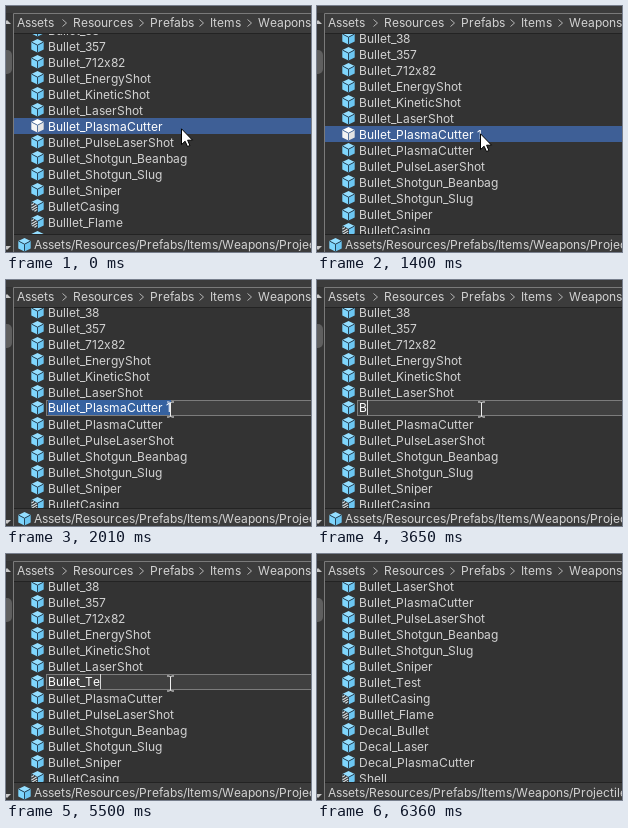
These frames come from a looping animation (305x246 px, 6.82 s). An HTML page:

```html
<!DOCTYPE html>
<html lang="en">
<head>
<meta charset="utf-8">
<title>Renaming a prefab</title>
<style>
  html, body { margin: 0; width: 100%; height: 100%; overflow: hidden; background: #333; }
  svg { display: block; }
  text {
    font: 12px Inter, "Liberation Sans", sans-serif;
    font-kerning: none;
    font-feature-settings: "calt" 0;
    fill: #d2d2d2;
    white-space: pre;
  }
  .on text { fill: #fff; }
  .cube { --top: #94deff; --left: #7fd6fd; --right: #6cc6f2; --edge: #27455a; }
  .on .cube { --top: #fff; --left: #f4f4f4; --right: #e4e4e4; --edge: #56749f; }
</style>
</head>
<body>
<svg id="stage" width="305" height="246" xmlns="http://www.w3.org/2000/svg">
  <defs>
    <g id="cube">
      <path d="M6.5 1 12.7 4 6.5 7.2.3 4Z" fill="var(--top)"/>
      <path d="M.3 4 6.5 7.2V14.6L.3 11.5Z" fill="var(--left)"/>
      <path d="M12.7 4 6.5 7.2V14.6L12.7 11.5Z" fill="var(--right)"/>
      <path d="M.8 4.2 6.5 7.2 12.2 4.2M6.5 7.2V14.4" fill="none" stroke="var(--edge)"/>
    </g>
    <g id="variant">
      <use href="#cube"/>
      <path d="M.3 4 6.5 7.2V14.6L.3 11.5Z" fill="#333"/>
      <path d="M.5 7 3 5.4M.5 10 5.6 6.8M1.2 12 6.2 9M3.4 13.2 6.2 11.6" stroke="#d5dde1" stroke-width="1.2"/>
    </g>
  </defs>

  <rect width="305" height="246" fill="#333"/>
  <svg id="list" x="8" y="28" width="297" height="200" viewBox="8 28 297 200"></svg>

  <!-- toolbar, path bar and footer -->
  <rect width="305" height="7" fill="#3c3c3c"/>
  <g id="bars">
    <rect x="8" y="8" width="297" height="19" fill="#3c3c3c"/>
    <rect x="8" y="27" width="297" height="1" fill="#232323"/>
    <rect x="8" y="228" width="297" height="18" fill="#3c3c3c"/>
    <rect x="8" y="228" width="297" height="1" fill="#232323"/>
    <use id="footIcon" class="cube" href="#cube" x="12" y="231"/>
  </g>

  <!-- tree scrollbar and panel outline -->
  <rect y="8" width="7" height="238" fill="#353535"/>
  <rect x="-8" y="44" width="14" height="24" rx="5" fill="#5f5f5f"/>
  <path d="M-3 18 1 14 5 18ZM-3 240H5L1 244Z" fill="#c8c8c8"/>
  <path d="M7.5 246V7.5H305" fill="none" stroke="#7a7a7a"/>

  <path id="arrow" d="M.5.8V16.6L4.1 13.2 6.5 18.5 8.9 17.5 6.6 12.2H11.5Z" fill="#fff" stroke="#000"/>
  <circle id="click" cx="162" cy="128" r="12" fill="#ff0" fill-opacity=".47"/>
  <path id="beam" d="M-3.5-7.5H-1L0-6.5 1-7.5H3.5M0-6.5V6.5M-3.5 7.5H-1L0 6.5 1 7.5H3.5" fill="none" stroke="#f0f0f0"/>
</svg>

<script>
const LOOP = 6820;
const EDIT = 2010, TYPE = 3650, DONE = 6360;
const NAME = "Bullet_Test";
const COPY = "Bullet_PlasmaCutter 1";
const $ = id => document.getElementById(id);
const list = $("list");

function add(parent, tag, attrs = {}) {
  const el = document.createElementNS("http://www.w3.org/2000/svg", tag);
  for (const k in attrs) el.setAttribute(k, attrs[k]);
  parent.append(el);
  return el;
}

// The editor's text sits on whole pixels: each letter's advance is rounded
const pen = document.createElement("canvas").getContext("2d");
pen.font = '12px Inter, "Liberation Sans", sans-serif';
const advance = c => Math.round(pen.measureText(c).width);
const width = s => [...s].reduce((sum, c) => sum + advance(c), 0);

function write(el, x, s) {
  el.setAttribute("x", [...s].map((c, i) => x + width(s.slice(0, i))).join(" "));
  el.textContent = s;
  return el;
}

const label = (parent, x, y, s) => write(add(parent, "text", { y }), x, s);
const place = (el, x, y) => el.setAttribute("transform", `translate(${x} ${y})`);
const show = (el, on) => el.setAttribute("display", on ? "inline" : "none");

// Last table entry whose time has come
const at = (table, t) => table.filter(s => s[0] <= t).pop();

// Path bar and footer
const bars = $("bars");
[["Assets", 11], ["Resources", 67], ["Prefabs", 144], ["Items", 204], ["Weapons", 252]]
  .forEach(([word, x], i) => {
    label(bars, x, 21, word);
    if (i) add(bars, "path", {
      d: `M${x - 10.5} 13.5l4 3.5-4 3.5`, fill: "none", stroke: "#b4b4b4"
    });
  });

const PATH = "Assets/Resources/Prefabs/Items/Weapons/Projectiles";
const footLong = label(bars, 28, 243, PATH);
const footBare = label(bars, 11, 243, PATH);

// File lists
const VARIANTS = ["BulletCasing", "Bulllet_Flame", "Shell"];
const bullet = s => s.split(" ").map(n => "Bullet_" + n);
const early = bullet("38 357 712x82 EnergyShot KineticShot LaserShot");
const late = bullet("PlasmaCutter PulseLaserShot Shotgun_Beanbag Shotgun_Slug Sniper");
const rest = ["BulletCasing", "Bulllet_Flame", "Decal_Bullet", "Decal_Laser", "Decal_PlasmaCutter", "Shell"];

function addRow(parent, name, y, selected) {
  const g = add(parent, "g", { class: selected ? "on" : "" });
  if (selected) add(g, "rect", { x: 8, y, width: 297, height: 16, fill: "#3e5f96" });
  const icon = VARIANTS.includes(name) ? "#variant" : "#cube";
  add(g, "use", { href: icon, class: "cube", x: 25, y });
  label(g, 42, y + 13, name);
}

function addList(names, top, selected) {
  const g = add(list, "g");
  names.forEach((n, i) => addRow(g, n, top + i * 16, n === selected));
  return g;
}

const before = addList([...early, ...late, ...rest.slice(0, 3)], 16, "Bullet_PlasmaCutter");
const copied = addList([...early, COPY, ...late, rest[0]], 24, COPY);
const renamed = addList([early[5], ...late, NAME, ...rest], 24);

// Rename field, covering the selected row
const field = add(list, "g", { class: "on" });
add(field, "rect", { x: 8, y: 120, width: 297, height: 16, fill: "#333" });
add(add(field, "g", { class: "off" }), "use", {
  href: "#cube", x: 25, y: 120,
  style: "--top:#94deff;--left:#7fd6fd;--right:#6cc6f2;--edge:#27455a"
});
add(field, "rect", { x: 40.5, y: 120.5, width: 270, height: 15, fill: "#404040", stroke: "#7c7c7c" });
const mark = add(field, "rect", { x: 42, y: 120, width: width(COPY), height: 15, fill: "#3662a0" });
const typed = label(field, 42, 132, COPY);
const caret = add(field, "rect", { y: 120, width: 1, height: 15, fill: "#d8d8d8" });

// Time and number of letters typed
const KEYS = [[TYPE, 1], [3800, 2], [4030, 3], [4260, 4], [4340, 5], [4490, 6],
  [5040, 7], [5350, 8], [5500, 9], [5730, 10], [5810, 11]];

// Time and share of the way from (175,122) to (162,128)
const MOVES = [[0, 0], [1170, .2], [1245, .45], [1320, .7], [1395, .9], [1470, 1]];

// Time and place of the text pointer
const BEAM = [[0, 164.5, 129.5], [6120, 199.5, 176.5], [6210, 241.5, 235.5]];

function draw(t) {
  show(before, t < 860);
  show(copied, t >= 860 && t < DONE);
  show(renamed, t >= DONE);
  show(field, t >= EDIT && t < DONE);

  const key = at(KEYS, t);
  const value = key ? NAME.slice(0, key[1]) : COPY;
  if (typed.textContent !== value) write(typed, 42, value);
  caret.setAttribute("x", 42 + width(value));
  show(mark, !key);
  show(caret, key);

  const k = at(MOVES, t)[1];
  place($("arrow"), Math.round(175 - 13 * k), Math.round(122 + 6 * k));
  show($("arrow"), t < EDIT);
  show($("click"), t >= 1700 && t < 1780);

  const [, x, y] = at(BEAM, t);
  place($("beam"), x, y);
  show($("beam"), t >= EDIT && t < 6290);

  show($("footIcon"), t < DONE);
  show(footLong, t < DONE);
  show(footBare, t >= DONE);
}

const start = performance.now();
function tick() {
  draw((performance.now() - start) % LOOP);
  requestAnimationFrame(tick);
}
tick();
</script>
</body>
</html>
```
